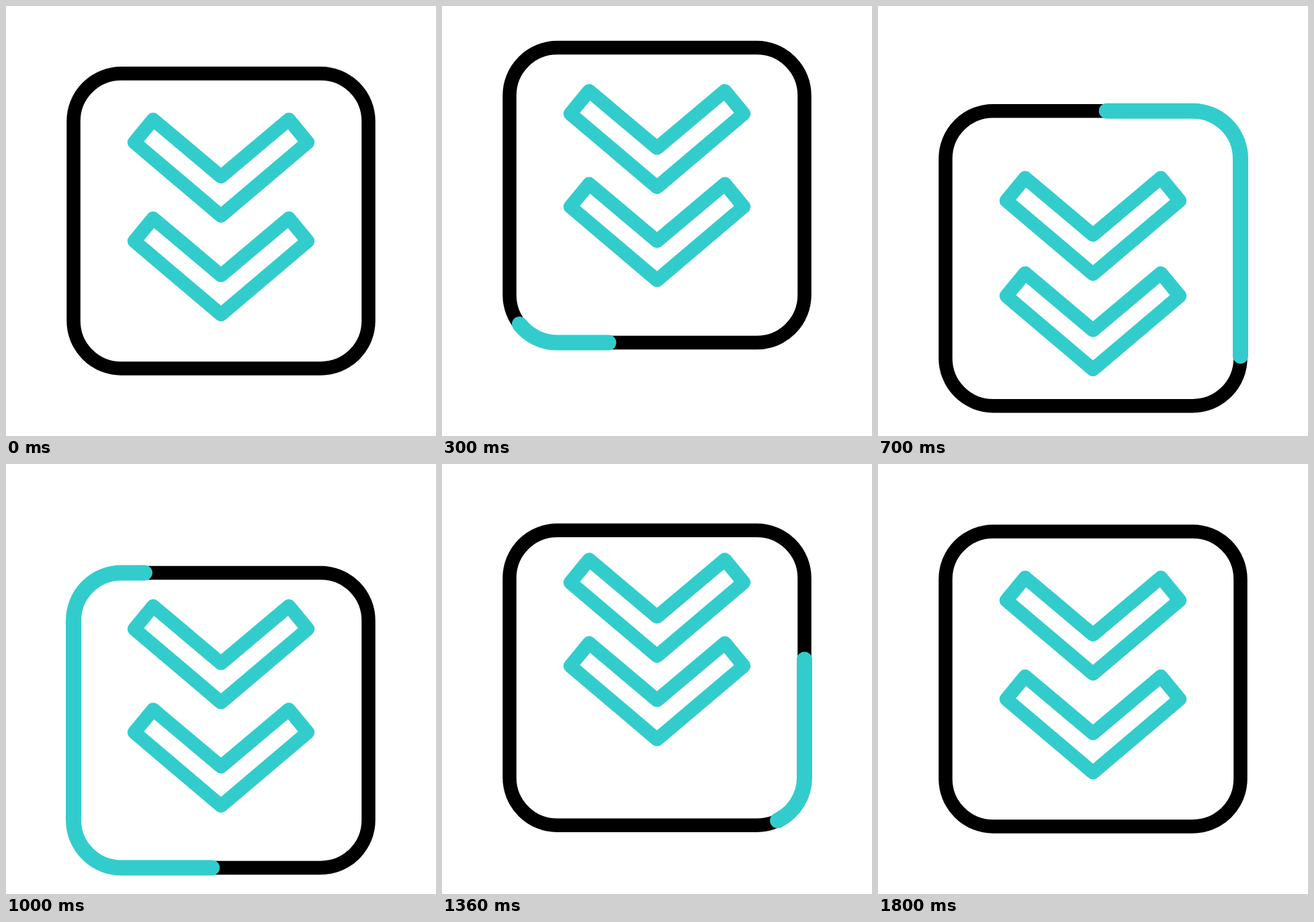
An HTML page for the animation above (2.72 s loop, 640x640 px).

```html
<!DOCTYPE html>
<html lang="en">
<head>
<meta charset="utf-8">
<title>Scroll down</title>
<style>
  html, body { margin: 0; width: 100%; height: 100%; overflow: hidden; background: #fff; }
  svg { display: block; width: 100vw; height: 100vh; }
  path, rect { fill: none; stroke: #33cccc; stroke-width: 20.5; stroke-linejoin: round; stroke-linecap: round; }
  #frame { stroke: #000; }
  #runner { stroke-width: 23; }
</style>
</head>
<body>
<svg viewBox="0 0 640 640">
  <defs>
    <path id="chevron" d="M219 169L191 203L320 312.3L449 203L421 169L320 254Z"/>
  </defs>
  <g id="box">
    <rect id="frame" x="100.5" y="100.5" width="439" height="439" rx="71"/>
    <rect id="runner" x="100.5" y="100.5" width="439" height="439" rx="71"/>
    <use id="upper" href="#chevron"/>
    <use id="lower" href="#chevron"/>
  </g>
</svg>
<script>
const LOOP = 2720, STEP = 20;
const SIDE = 297, ARC = 71 * Math.PI / 2, PERIMETER = 4 * (SIDE + ARC);
const CHEVRON_GAP = 147;
const $ = id => document.getElementById(id);

const linear = u => u;
const sineIn = u => 1 - Math.cos(u * Math.PI / 2);
const sineOut = u => Math.sin(u * Math.PI / 2);
const sineInOut = u => (1 - Math.cos(u * Math.PI)) / 2;

// Bezier easing with handles (x1, 0) and (x2, 1), solved by bisection.
const bezierEase = (x1, x2) => u => {
  let low = 0, high = 1, s = 0.5;
  for (let i = 0; i < 24; i++) {
    const x = 3 * x1 * s * (1 - s) ** 2 + 3 * x2 * s * s * (1 - s) + s ** 3;
    if (x < u) low = s; else high = s;
    s = (low + high) / 2;
  }
  return s * s * (3 - 2 * s);
};

// Each key is [time, value, easing used on the way there].
const motion = (keys, ease) => t => {
  const i = keys.findIndex(key => key[0] > t);
  if (i < 0) return keys[keys.length - 1][1];
  const [t0, v0] = keys[i - 1], [t1, v1, own = ease] = keys[i];
  return v0 + (v1 - v0) * own((t - t0) / (t1 - t0));
};

const boxY = motion([[0, 0], [298, -39], [850, 65, sineOut], [900, 65],
  [1500, -39, sineIn], [1800, 0]], linear);

// The chevrons sway inside the box, the lower one trailing the upper.
const upperY = motion([[0, 0], [190, -13], [590, 37], [1180, -34], [1700, 0]], sineInOut);
const lowerY = motion([[0, 0], [280, -13], [710, 26], [1290, -50], [1800, 0]], sineInOut);

// The runner makes two clockwise turns from the bottom right corner.
const RUN_START = 2 * (SIDE + ARC), RUN_TIME = 1437;
const headEase = bezierEase(0.33, 0.7), tailEase = bezierEase(0.42, 1);
const along = (ease, t) => RUN_START + 2 * PERIMETER * ease(Math.min(t / RUN_TIME, 1));

const shift = (id, y) => $(id).setAttribute('transform', `translate(0 ${y.toFixed(2)})`);

function draw(t) {
  shift('box', boxY(t));
  shift('upper', upperY(t));
  shift('lower', CHEVRON_GAP + lowerY(t));
  const tail = along(tailEase, t), length = along(headEase, t) - tail, runner = $('runner');
  runner.style.display = length > 0.5 ? '' : 'none';
  runner.setAttribute('stroke-dasharray', `${length} ${PERIMETER - length}`);
  runner.setAttribute('stroke-dashoffset', -(tail % PERIMETER));
}

const start = performance.now();
function tick() {
  const t = (performance.now() - start) % LOOP;
  draw(Math.floor(t / STEP) * STEP);
  requestAnimationFrame(tick);
}
tick();
</script>
</body>
</html>
```
